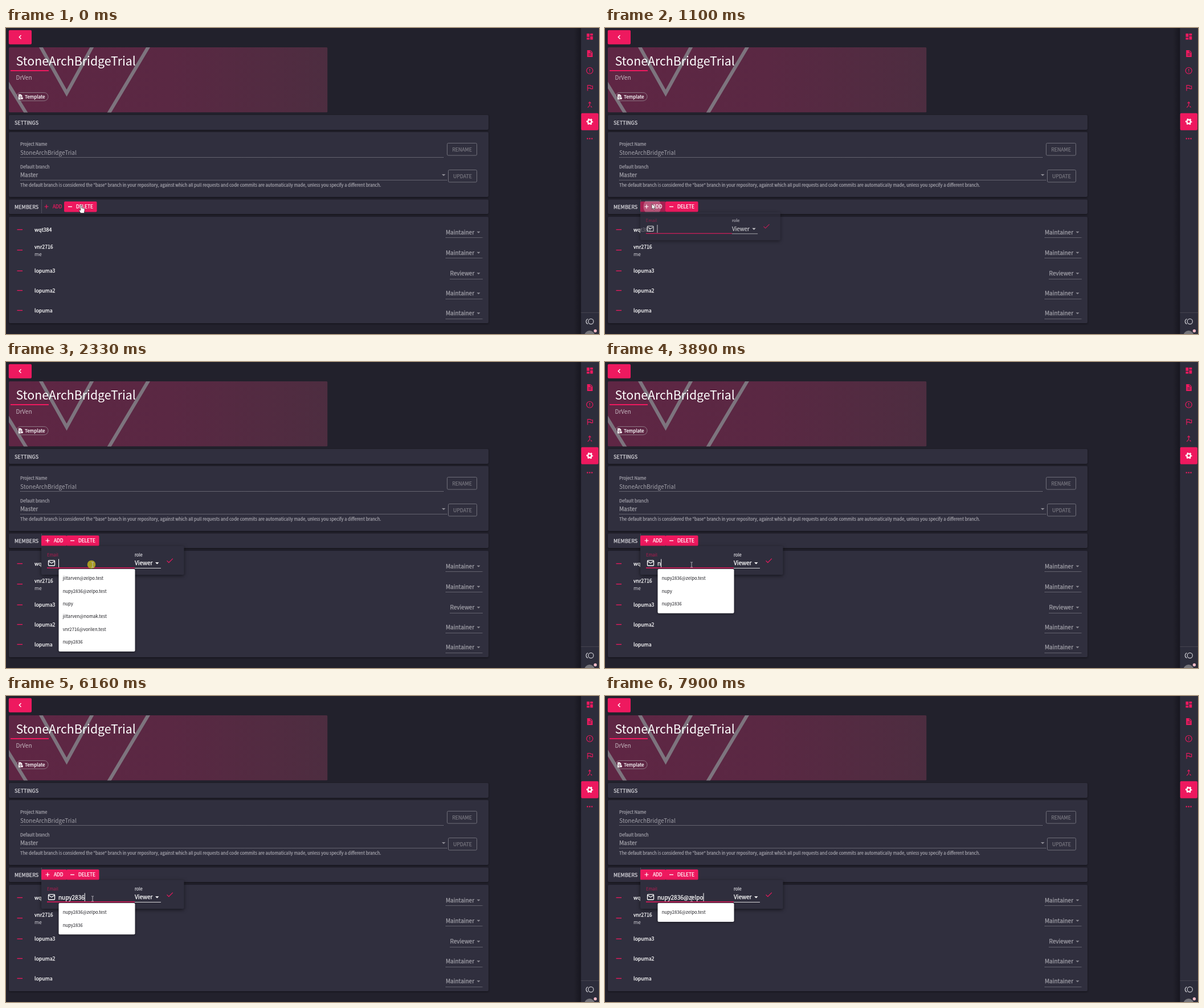
Recreate the animation shown at these times as an HTML page. Size 1041x538 px, loop 8 s.

```html
<!DOCTYPE html>
<html lang="en">
<head>
<meta charset="utf-8">
<title>Project settings</title>
<style>
  html, body { margin: 0; width: 100%; height: 100%; overflow: hidden; background: #22212c; }
  svg { display: block; }
  #stage {
    --pink: #ee195f;
    font: 500 8.75px "Noto Sans CJK KR", "Noto Sans CJK JP", "Noto Sans CJK SC", "Noto Sans CJK", "Source Sans Pro", sans-serif;
    fill: #fff;
    color: #fff;
  }
  /* a hairline stroke gives the medium weight */
  text { white-space: pre; fill: currentColor; stroke: currentColor; stroke-width: .25px; }
  .thin { stroke: none; font-weight: 400; }
  .panel { fill: #302f3e; filter: drop-shadow(0 1px 1.5px #0007); }
  .pink { fill: var(--pink); }
  .pinkline { stroke: var(--pink); fill: none; }
  .head { font-size: 9px; color: #dcdbe0; }
  .label { font-size: 7.5px; color: #a09fa8; }
  .value { font-size: 10px; color: #a3a2aa; }
  .off { color: #77767f; }
  .box { fill: none; stroke: #6f6e79; }
  .dotted { stroke: #96959e; stroke-dasharray: 1 1; }
  .white { stroke: #fff; fill: none; }
  .small { font-size: 8.3px; }
</style>
</head>
<body>
<svg id="stage" width="1041" height="538" viewBox="0 0 1041 538">
  <defs>
    <linearGradient id="heroFill"><stop stop-color="#5f2644"/><stop offset=".5" stop-color="#5a2843"/><stop offset="1" stop-color="#4d2d40"/></linearGradient>
    <linearGradient id="edge"><stop stop-color="#17161f" stop-opacity="0"/><stop offset="1" stop-color="#17161f"/></linearGradient>
  </defs>
  <rect width="1041" height="538" fill="#22212c"/>

  <rect x="4.800" y="3.700" width="40.200" height="25" rx="2" class="pink"/>
  <path d="M26.500 12.700l-3.300 3.300 3.300 3.300" class="white" stroke-width="1.400"/>

  <svg x="5" y="34" width="559.500" height="114.500" viewBox="5 34 559.500 114.500">
    <rect x="5" y="34" width="559.500" height="114.500" rx="2" fill="url(#heroFill)"/>
    <path d="M58 28L106.500 114.500L154 28M253 28L178 154M0 92L38 154" fill="none" stroke="#7d747e" stroke-width="6"/>
  </svg>
  <text x="17.500" y="66" class="thin" style="font-size:21.300px;font-weight:300">StoneArchBridgeTrial</text>
  <path d="M8 75H75" class="pinkline" stroke-width="2"/>
  <text x="17.500" y="90.500" font-size="10" class="thin" color="#c9bcc4">DrVen</text>
  <rect x="18.500" y="113.500" width="55.500" height="14.500" rx="7.200" fill="none" stroke="#8b7582"/>
  <path d="M22 116.500h4l2.500 2.500v6.500H22z"/>
  <path d="M23.500 120h3M23.500 122.500h2" stroke="#5f2644"/>
  <circle cx="28" cy="123.500" r="2.200" stroke="#5f2644" stroke-width=".7"/>
  <text x="33" y="124" font-size="8.100">Template</text>

  <rect x="5" y="153" width="842" height="26" rx="2" class="panel"/>
  <text x="15" y="169.500" class="head">SETTINGS</text>

  <rect x="5" y="183" width="842" height="114" rx="2" class="panel"/>
  <text x="25" y="206.500" class="label">Project Name</text>
  <text x="25" y="222.500" class="value thin">StoneArchBridgeTrial</text>
  <path d="M25 227.500H769M25 267.500H775" class="dotted"/>
  <rect x="774.500" y="202.500" width="52" height="21.500" rx="2" class="box"/>
  <text x="800.500" y="216.700" text-anchor="middle" class="off">RENAME</text>
  <text x="25" y="246.500" class="label">Default branch</text>
  <text x="25" y="262" class="value">Master</text>
  <path d="M765 257h6.500l-3.200 3.300z" fill="#8c8b94"/>
  <rect x="776.500" y="249.500" width="50" height="21.500" rx="2" class="box"/>
  <text x="801.500" y="263.500" text-anchor="middle" class="off">UPDATE</text>
  <text x="25" y="279.200" class="label">The default branch is considered the “base” branch in your repository, against which all pull requests and code commits are automatically made, unless you specify a different branch.</text>

  <rect x="5" y="301.500" width="842" height="25.500" rx="2" class="panel"/>
  <text x="15" y="317.500" class="head">MEMBERS</text>
  <path d="M62.500 302V326" class="dotted" opacity=".6"/>
  <rect x="5" y="332" width="842" height="187" rx="2" class="panel"/>
  <g id="members"></g>

  <svg x="62" y="304" width="45" height="20" viewBox="62 304 45 20">
    <rect id="addFill" x="62" y="305" width="44.500" height="18.500" rx="2" class="pink"/>
    <circle id="ripple" cx="83" cy="314" fill="#fff"/>
  </svg>
  <g id="add">
    <path d="M67.500 314h7M71 310.500v7" stroke="currentColor" stroke-width="1.200"/>
    <text x="82" y="317.300" class="small">ADD</text>
  </g>
  <g id="delete">
    <rect x="102" y="305" width="57.500" height="18.500" rx="2" class="pink"/>
    <path d="M109 314.200h7" class="white" stroke-width="1.300"/>
    <text x="123" y="317.300" class="small">DELETE</text>
  </g>

  <g id="menu">
    <rect x="62" y="323.500" width="250.500" height="50.500" rx="2" fill="#2f2e3d" style="filter:drop-shadow(0 2px 3px #0008)"/>
    <text x="72" y="341.700" font-size="7.500" class="thin" color="#b51a4f">Email</text>
    <rect x="74.500" y="348.800" width="11" height="9.200" rx="1" class="white" stroke-width="1.300"/>
    <path d="M75 350.500l5 3.300 5-3.300" class="white" stroke-width="1.300"/>
    <text id="typed" x="92" y="357.500" font-size="10"></text>
    <path id="caret" d="M0 346.500V361" class="white" stroke-width="1"/>
    <path d="M72 362H226" class="pinkline" stroke-width="1.300"/>
    <text x="226" y="341.500" font-size="7.500" color="#d5d4da">role</text>
    <text x="226" y="357.300" font-size="10">Viewer</text>
    <path d="M262 352.300h6.500l-3.200 3.300z"/>
    <path d="M226 362.500H272" class="white" stroke-width=".8"/>
    <path d="M282.500 349.300l3.300 3.300 7-7" class="pinkline" stroke-width="1.200"/>
  </g>
  <g id="hints"></g>

  <rect x="997" width="12.500" height="538" fill="url(#edge)"/>
  <rect x="1009.500" width="31.500" height="538" fill="#2d2d3b"/>
  <rect x="1009.700" y="149.800" width="30.300" height="30" rx="2" class="pink"/>
  <g class="pink">
    <path d="M1019.500 9.700h4.800v6h-4.800zm0 7.200h4.800v3.600h-4.800zm6 -7.200h4.800v3.600h-4.800zm0 4.800h4.800v6h-4.800z"/>
    <path d="M1020.200 39h6l3.600 3.600v8.400h-9.600z"/>
    <path d="M1022.500 45.500h5M1022.500 48h5M1026 39.500v3.300h3.300" stroke="#2d2d3b" fill="none"/>
    <circle cx="1020.800" cy="194.500" r="1.200"/><circle cx="1024.700" cy="194.500" r="1.200"/><circle cx="1028.600" cy="194.500" r="1.200"/>
  </g>
  <g class="pinkline" stroke-width="1.200">
    <circle cx="1024.700" cy="75" r="5.500"/>
    <path d="M1024.700 72v3.600M1024.700 76.800v1.200"/>
    <path d="M1021 110.500V100.800h4.800l.6 1.200h3.300v4.900h-3l-.6-1.200h-5.100"/>
    <path d="M1024.700 131.500v4.800l-3.500 3.500M1026.500 137.500l2 2M1022.500 132.300l2.200-2.200 2.200 2.200"/>
  </g>
  <g class="white">
    <circle cx="1024.700" cy="164.700" r="3.300" stroke-width="2.400"/>
    <circle cx="1024.700" cy="164.700" r="5" stroke-width="1.600" stroke-dasharray="2.618 2.618" stroke-dashoffset="1.309"/>
  </g>
  <path d="M1009.500 500.500H1041" stroke="#45444f"/>
  <g fill="none" stroke="#c9c8cf" stroke-width="1.200">
    <circle cx="1026.800" cy="516" r="4.600"/>
    <path d="M1021.500 511.500a4.800 4.800 0 0 0 0 9"/>
  </g>
  <circle cx="1024.500" cy="541" r="9" fill="#75747a"/>
  <circle cx="1034.500" cy="532.500" r="2.700" fill="#efb9c6"/>

  <circle id="click" cx="150" cy="356" r="7.300" fill="#a69a22"/>
  <g id="cursor">
    <path id="hand" d="M-1.200 1Q0 -.6 1.200 1V5.500L5.200 6.500Q6.500 7 6.200 9L5.200 14.500H-1L-4 9.500Q-3.500 8 -1.200 9.500Z" stroke="#222" stroke-width=".7"/>
    <path id="arrow" d="M0 0V9.500L2.200 7.500 3.800 11 5.300 10.300 3.700 7H6.700Z" stroke="#222" stroke-width=".6"/>
    <path id="beam" d="M-2 -4.500h1.500l.5 .5.500 -.5H2M0 -4V4M-2 4.500h1.500l.5 -.5.500 .5H2" fill="none" stroke="#c4c3ca" stroke-width=".9"/>
  </g>
</svg>
<script>
const LOOP = 8000;
const $ = id => document.getElementById(id);
const set = (id, attrs) => { for (const k in attrs) $(id).setAttribute(k, attrs[k]); };
const show = (id, on) => set(id, { visibility: on ? 'visible' : 'hidden' });
const ramp = (t, from, to) => Math.min(1, Math.max(0, (t - from) / (to - from)));
const smooth = p => p * p * (3 - 2 * p);
const easeOut = p => 1 - (1 - p) ** 3;

// name, name y, minus y, role, role y
const members = [
  ['wqt384', 354.5, 354.5, 'Maintainer', 359],
  ['vnr2716', 384.5, 390.5, 'Maintainer', 395],
  ['lopuma3', 427, 427, 'Reviewer', 431.5],
  ['lopuma2', 462, 461.5, 'Maintainer', 466.5],
  ['lopuma', 497, 496.5, 'Maintainer', 501.5]
];
$('members').innerHTML = members.map(([name, y, minusY, role, roleY]) => {
  const x = role === 'Reviewer' ? 779.5 : 772;
  return `<path d="M19.500 ${minusY}h9.500" class="pinkline" stroke-width="1.300"/>
    <text x="50" y="${y + 3}">${name}</text>
    <text x="${x}" y="${roleY + 3.7}" class="value">${role}</text>
    <path d="M826.500 ${roleY - 1.3}h6l-3 3z" fill="#8c8b94"/>
    <path d="M${x} ${Math.floor(roleY + 9.5)}.500H836.500" class="dotted"/>`;
}).join('') + '<text x="50" y="400.500" class="thin" color="#d0cfd6">me</text>';

const hints = ['jiltarven@zelpo.test', 'nupy2836@zelpo.test', 'nupy',
  'jiltarven@nomak.test', 'vnr2716@vorilen.test', 'nupy2836'];
const entry = 'nupy2836@zelpo';
const keyTimes = [3890, 3970, 4520, 4760, 5330, 5610, 6030, 6160, 6920, 7250, 7410, 7560, 7660, 7900];
const pointer = [[30, 132, 311], [330, 74, 309], [470, 82, 309], [1080, 82, 309],
  [1800, 144, 349.5], [1830, 144, 349.5], [2100, 152, 356.5]];

function pointerAt(t) {
  const i = pointer.findIndex(p => p[0] > t);
  if (i < 1) return (i ? pointer.at(-1) : pointer[0]).slice(1);
  const [a, b] = [pointer[i - 1], pointer[i]];
  const p = smooth(ramp(t, a[0], b[0]));
  return [a[1] + (b[1] - a[1]) * p, a[2] + (b[2] - a[2]) * p];
}

let shownHints = null;
function drawHints(t, typed) {
  const list = t < 2330 ? [] : hints.filter(h => h.startsWith(typed));
  const key = list.join();
  if (key === shownHints) return;
  shownHints = key;
  $('hints').innerHTML = list.length ? `<rect x="92.500" y="364" width="134" height="${10.5 + 22.4 * list.length}" rx="2" style="filter:drop-shadow(0 1px 2px #0006)"/>`
    + list.map((h, i) => `<text x="99.700" y="${383.2 + 22.4 * i}" font-size="7.700" class="thin" color="#1d1d22">${h}</text>`).join('') : '';
}

function draw(t) {
  const hover = ramp(t, 760, 810);
  const pressed = ramp(t, 1000, 1080) * (1 - ramp(t, 1200, 1550));
  set('addFill', { opacity: hover * (1 - 0.38 * pressed) });
  set('add', { transform: `translate(${2 * hover})`, color: hover > 0.5 ? '#fff' : '#ee195f' });
  set('delete', { transform: `translate(${4 * hover})` });
  set('ripple', { r: 22 * easeOut(ramp(t, 1000, 1300)), opacity: 0.24 * pressed });

  const scale = 0.8 + 0.2 * easeOut(ramp(t, 1030, 1160));
  set('menu', {
    opacity: ramp(t, 1030, 1130),
    transform: `translate(62 322.500) scale(${scale}) translate(-62 -322.500)`
  });

  const count = keyTimes.filter(k => k <= t).length;
  const typed = entry.slice(0, count);
  if ($('typed').textContent !== typed) $('typed').textContent = typed;
  const blinkStart = count ? keyTimes[count - 1] : 1090;
  const caretX = 92.5 + (count ? $('typed').getComputedTextLength() : 0);
  set('caret', { transform: `translate(${caretX})` });
  show('caret', t >= blinkStart && (t - blinkStart) % 1020 < 510);
  drawHints(t, typed);

  const [x, y] = pointerAt(t);
  set('cursor', { transform: `translate(${x} ${y})` });
  show('hand', t < 1050);
  show('arrow', t >= 1050 && y < 345);
  show('beam', y >= 345);
  show('click', t >= 2300 && t < 2410);
}

const start = performance.now();
function tick() {
  draw((performance.now() - start) % LOOP);
  requestAnimationFrame(tick);
}
tick();
</script>
</body>
</html>
```
